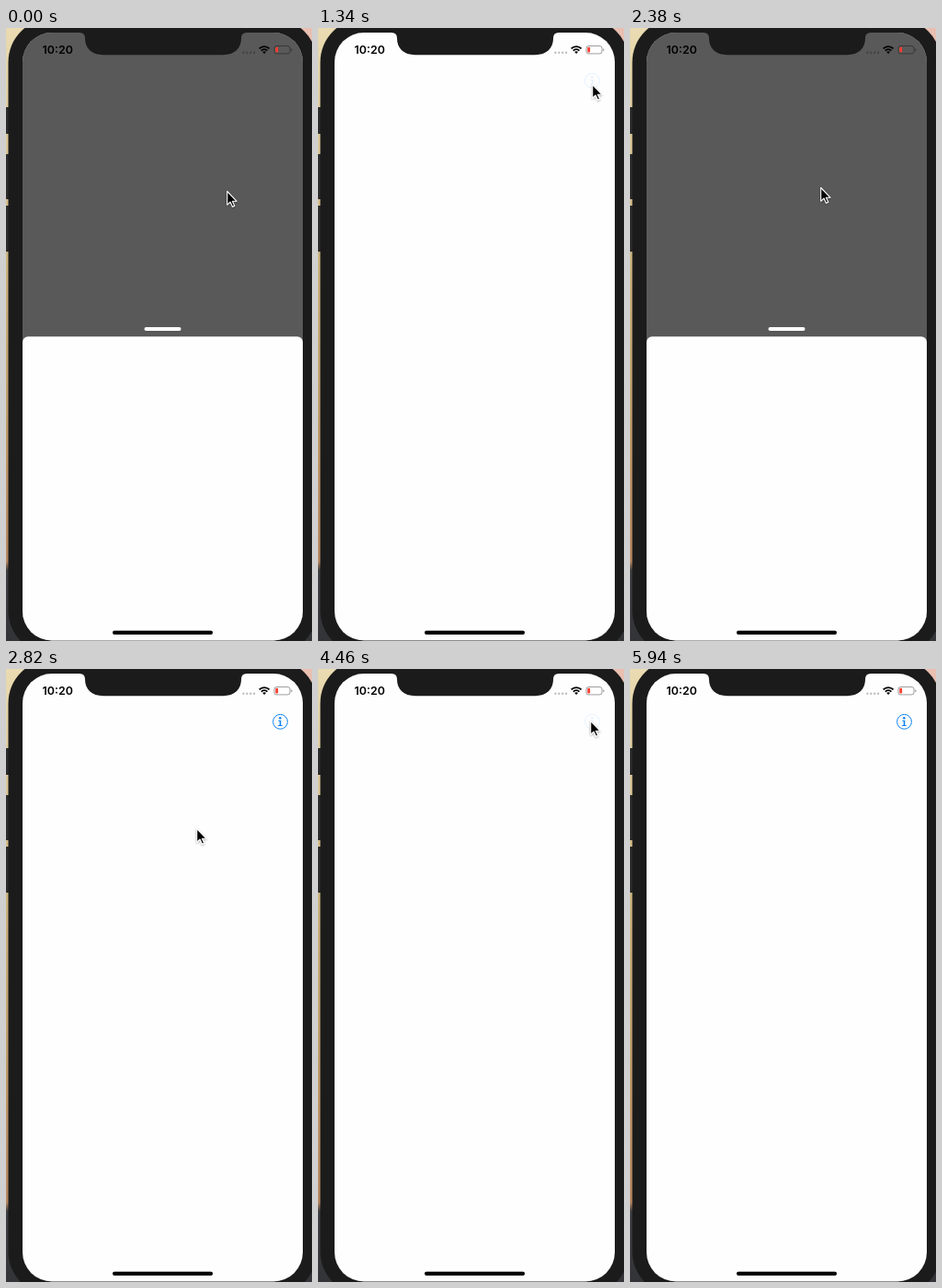
These frames come from a looping animation (333x666 px, 6790 ms). An HTML page:

```html
<!DOCTYPE html>
<html lang="en">
<head>
<meta charset="utf-8">
<title>Bottom sheet demo</title>
<style>
  html, body { margin: 0; width: 100%; height: 100%; overflow: hidden; background: #1b1b1b; }
  svg { display: block; width: 333px; height: 666px; }
  text { font: 600 12.4px Inter, "Liberation Sans", sans-serif; }
</style>
</head>
<body>
<svg viewBox="0 0 333 666">
  <defs>
    <linearGradient id="desk" x1="0" y1="0" x2="0" y2="1">
      <stop offset="0" stop-color="#eadbb2"/>
      <stop offset=".4" stop-color="#cbb07a"/>
      <stop offset=".87" stop-color="#b5855e"/>
      <stop offset=".885" stop-color="#3c3d42"/>
      <stop offset="1" stop-color="#333438"/>
    </linearGradient>
    <clipPath id="glass"><rect x="18" y="5" width="305" height="660.5" rx="32"/></clipPath>
    <filter id="soft" x="-50%" y="-50%" width="200%" height="200%">
      <feDropShadow dx="0" dy="1" stdDeviation=".9" flood-opacity=".35"/>
    </filter>
  </defs>

  <!-- desktop and phone body -->
  <rect width="333" height="666" fill="url(#desk)"/>
  <rect x="300" width="33" height="40" fill="#e9bfb2"/>
  <path d="M0 86h4v29H0zM0 137h4v49H0zM0 193h4v50H0z" fill="#2b2b2b"/>
  <rect x="2.5" y="-10" width="336" height="690" rx="47" fill="#1b1b1b"/>

  <g clip-path="url(#glass)">
    <rect x="18" y="5" width="305" height="661" fill="#fefefe"/>
    <g id="info" fill="#0a80f5">
      <circle cx="298.5" cy="57.3" r="7.9" fill="none" stroke="#0a80f5"/>
      <circle cx="298.3" cy="53.3" r="1.25"/>
      <path d="M296.3 55.8h3v5.3h1.4v1h-4.6v-1h1.6v-4.3h-1.4z"/>
    </g>
    <rect id="dim" x="18" y="5" width="305" height="661"/>
    <g id="sheet">
      <rect x="150.5" y="-10.2" width="40" height="4.1" rx="2" fill="#fff"/>
      <rect x="18" width="305" height="700" rx="6" fill="#fefefe"/>
    </g>

    <!-- status bar -->
    <text x="39.6" y="28">10:20</text>
    <path d="M258.4 26.8h12" fill="none" stroke="#000" stroke-opacity=".25" stroke-width="2.4"
          stroke-linecap="round" stroke-dasharray="0 3.9"/>
    <g fill="none" stroke="#000" stroke-width="1.8">
      <path d="M275.6 22.3a7.8 7.8 0 0 1 11 0"/>
      <path d="M277.8 24.6a4.7 4.7 0 0 1 6.6 0"/>
    </g>
    <path d="M279.2 26.1a2.7 2.7 0 0 1 3.8 0l-1.9 1.9z"/>
    <rect x="292" y="19.5" width="17" height="8.4" rx="2.4" fill="none" stroke="#000" stroke-opacity=".38"/>
    <path d="M310.2 22.2q1.3 .3 1.3 1.5t-1.3 1.5z" fill-opacity=".4"/>
    <rect x="293.3" y="20.8" width="2.8" height="5.8" rx="1" fill="#ff3b30"/>

    <rect x="116" y="654.8" width="109" height="4.1" rx="2"/>
  </g>

  <!-- notch -->
  <path d="M80 4V5Q86 5 86 11C86 22 93 29.2 106 29.2H236C249 29.2 256 22 256 11Q256 5 262 5V4Z" fill="#1b1b1b"/>

  <g id="cursor" filter="url(#soft)">
    <path d="M.7 1.5v14.6l3.4-3.1 2.4 5.2 2.2-1-2.3-5h4.5z" stroke="#fff" stroke-width="1.1" stroke-linejoin="round"/>
  </g>
</svg>
<script>
  const LOOP = 6790, TICK = 148.4;
  const REST = 335.2, BOTTOM = 666, HIDDEN = 690;
  const SPRING = 0.0155, FADE = 200, DIM = 0.647;

  // each visit: button pressed, sheet opens, sheet dismissed
  const visits = [
    { press: -LOOP, open: -LOOP, close: 140 },
    { press: 1320, open: 1532, close: 2665 },
    { press: 4300, open: 4537, close: 5330 }
  ];

  const home = { x: 240, y: 176 };
  const glides = [
    { from: 700, to: 1330, x: 298, y: 60 },
    { from: 1850, to: 2370, x: 207, y: 172 },
    { from: 3650, to: 4300, x: 296, y: 55 },
    { from: 4600, to: 4890, x: 187, y: 243 },
    { from: 5400, to: 5780, x: 175, y: 383 }
  ];
  const POINTER_OFF = 5930;

  const el = id => document.getElementById(id);
  const [cursor, sheet, dim, info] = ['cursor', 'sheet', 'dim', 'info'].map(el);
  const move = (node, x, y) => node.setAttribute('transform', `translate(${x} ${y})`);
  const clamp = v => Math.min(1, Math.max(0, v));
  const ease = p => p * p * (3 - 2 * p);
  const springLeft = s => (1 + s) * Math.exp(-s);   // critically damped

  function pointerAt(t) {
    let { x, y } = home;
    for (const g of glides) {
      const p = ease(clamp((t - g.from) / (g.to - g.from)));
      x += (g.x - x) * p;
      y += (g.y - y) * p;
    }
    return [x, y];
  }

  function sheetAt(t) {
    const visit = visits.find(v => t >= v.press && t < v.close);
    if (!visit) return { top: HIDDEN, shade: 0, glow: 1 };
    const age = t - visit.open;
    if (age < 0) return { top: HIDDEN, shade: 0, glow: .1 };
    return {
      top: REST + (BOTTOM - REST) * springLeft(age * SPRING),
      shade: clamp(age / FADE),
      glow: 0
    };
  }

  const start = performance.now();

  function draw() {
    const now = (performance.now() - start) % LOOP;
    const t = Math.floor(now / TICK) * TICK;
    const { top, shade, glow } = sheetAt(t);
    move(cursor, ...pointerAt(t));
    cursor.setAttribute('opacity', t < POINTER_OFF ? 1 : 0);
    move(sheet, 0, top);
    dim.setAttribute('opacity', shade * DIM);
    info.setAttribute('opacity', glow);
    requestAnimationFrame(draw);
  }
  draw();
</script>
</body>
</html>
```
